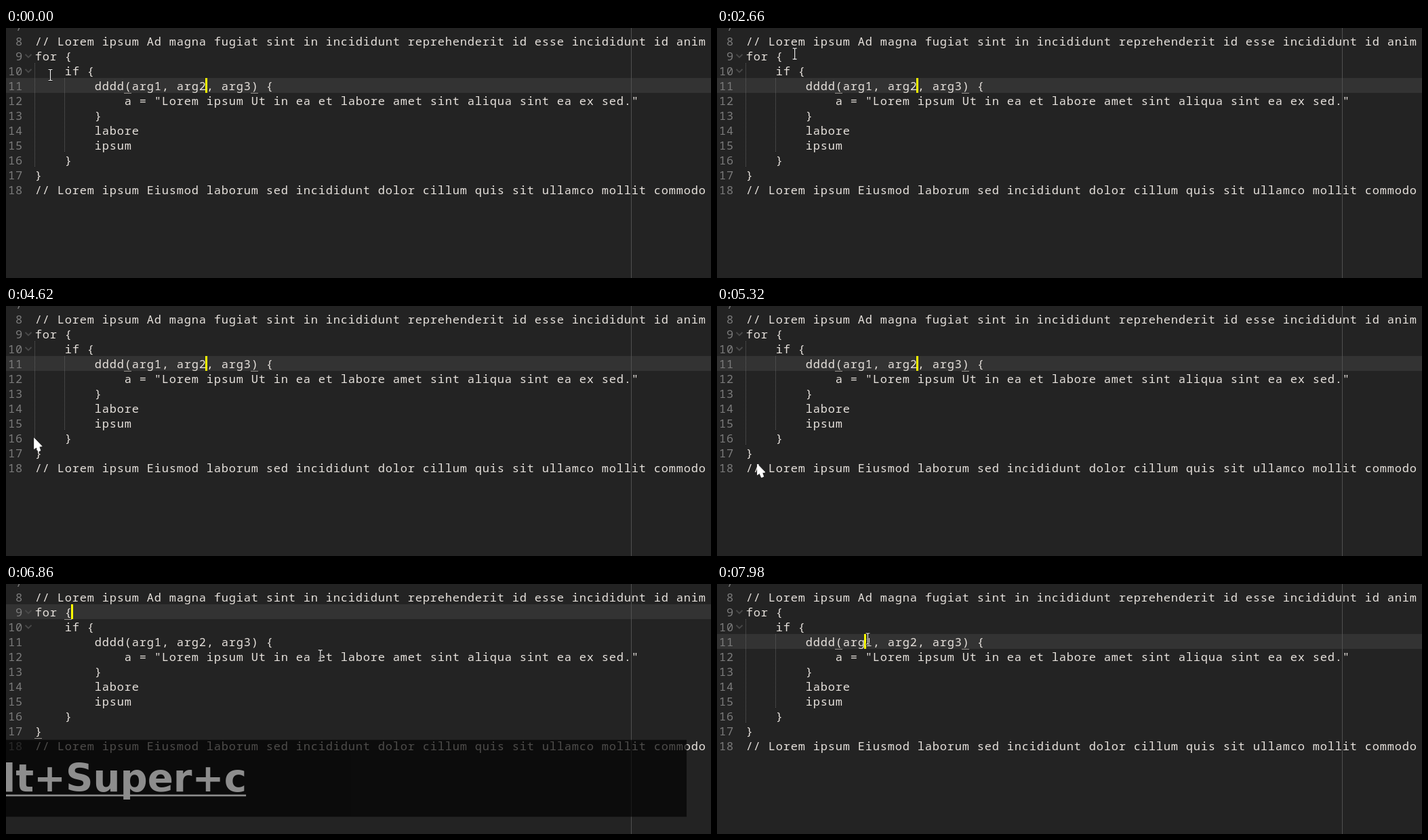
An HTML page that plays this animation: 1040x370 px, repeating every 8 s.

```html
<!DOCTYPE html>
<html lang="en">
<head>
<meta charset="utf-8">
<title>Editor</title>
<style>
  html, body { margin: 0; width: 100%; height: 100%; overflow: hidden; background: #232323; }
  svg { display: block; width: 1040px; height: 370px; }
  .code { font: 17px "Noto Sans Mono", "DejaVu Sans Mono", monospace; letter-spacing: .8px; fill: #e6e1dc; white-space: pre; }
  .num { fill: #7c7c7c; }
  .keys { font: bold 63.2px "DejaVu Sans", sans-serif; fill: #c3c3c3; text-anchor: end; }
</style>
</head>
<body>
<svg id="stage" viewBox="0 0 1040 370"></svg>
<script>
const LOOP = 8000, STEP = 70;
const LEFT = 42, CHAR = 11, ROW = 22, FIRST_ROW = 7;
const GLYPH_SHIFT = .7;
const JUMP = 6720, CLICK = 7840;
const stage = document.getElementById("stage");

const colX = col => LEFT + col * CHAR;
const rowY = row => 8 + (row - 8) * ROW;
const clamp = v => Math.min(1, Math.max(0, v));
const progress = (t, from, to) => clamp((t - from) / (to - from));
const easeOut = p => 1 - (1 - p) ** 2;
const easeInOut = p => p ** 3 * (10 - 15 * p + 6 * p * p);

function add(parent, tag, attrs = {}, text) {
  const el = document.createElementNS("http://www.w3.org/2000/svg", tag);
  for (const name in attrs) el.setAttribute(name, attrs[name]);
  if (text) el.textContent = text;
  parent.append(el);
  return el;
}

const show = (el, on) => el.setAttribute("visibility", on ? "visible" : "hidden");

const source = `
// Lorem ipsum Ad magna fugiat sint in incididunt reprehenderit id esse incididunt id anim
for {
    if {
        dddd(arg1, arg2, arg3) {
            a = "Lorem ipsum Ut in ea et labore amet sint aliqua sint ea ex sed."
        }
        labore
        ipsum
    }
}
// Lorem ipsum Eiusmod laborum sed incididunt dolor cillum quis sit ullamco mollit commodo`;

add(stage, "rect", { width: 1040, height: 370, fill: "#232323" });
const active = add(stage, "rect", { width: 1040, height: ROW, fill: "#333" });
add(stage, "rect", { x: 922, width: 1, height: 370, fill: "#505050" });

const guides = add(stage, "g", { stroke: "#626262", "stroke-dasharray": "1 1" });
function guide(col, from, to) {
  const x = colX(col) + .5;
  add(guides, "line", { x1: x, x2: x, y1: rowY(from), y2: rowY(to + 1) });
}
guide(0, 10, 16);
guide(4, 11, 15);

source.split("\n").forEach((line, i) => {
  const row = FIRST_ROW + i, y = rowY(row) + 18;
  const indent = line.length - line.trimStart().length;
  const digits = String(row).length;
  add(stage, "text", { class: "code num", x: colX(-1.6 - digits) + GLYPH_SHIFT, y }, String(row));
  add(stage, "text", { class: "code", x: colX(indent) + GLYPH_SHIFT, y }, line.trimStart());
});

for (const row of [9, 10]) {
  add(stage, "path", {
    d: `M28.5 ${rowY(row) + 9}l4.5 4.5l4.5 -4.5`,
    fill: "none", stroke: "#494949", "stroke-width": 1.8
  });
}

function bracket(group, row, col) {
  add(group, "rect", { x: colX(col), y: rowY(row) + ROW, width: CHAR, height: 1 });
}
const parens = add(stage, "g", { fill: "#98948f" });
bracket(parens, 11, 12);
bracket(parens, 11, 29);
const braces = add(stage, "g", { fill: "#98948f" });
bracket(braces, 9, 4);
bracket(braces, 17, 0);
const caret = add(stage, "rect", { width: 3, height: ROW, fill: "#ff0" });

const overlay = add(stage, "g");
add(overlay, "rect", { x: -700, y: 246, width: 1769, height: 128 });
add(overlay, "text", { class: "keys", x: 339, y: 332 }, "Alt+Super+c");
const underline = add(overlay, "rect", { x: -300, y: 337, width: 638, height: 3, fill: "#c3c3c3" });

const beam = add(stage, "g", { fill: "none" });
const beamPath = "M-3 -8.5H-1Q0 -8.5 0 -7.5V6.5Q0 7.5 -1 7.5H-3M3 -8.5H1Q0 -8.5 0 -7.5M0 6.5Q0 7.5 1 7.5H3";
add(beam, "path", { d: beamPath, stroke: "#111", "stroke-width": 2.8 });
add(beam, "path", { d: beamPath, stroke: "#f4f4f4", "stroke-width": 1.2 });
const arrow = add(stage, "path", {
  d: "M.5 0V16L3.8 13.6L6.5 19.8L9.8 18.4L7.8 12.8L12 12Z",
  fill: "#fff", stroke: "#fff", "stroke-width": .8, "stroke-linejoin": "round"
});

// Each move starts where the last one ended; bend bows it sideways.
const moves = [];
function move(from, to, x, y, bend = [0, 0], ease = easeOut) {
  moves.push({ from, to, end: [x, y], bend, ease });
}
move(0, 770, 117, 40.5);
move(1190, 1330, 111.5, 58.5);
move(1470, 1610, 94.5, 62.5);
move(1750, 2310, 88, 68, [8, -28]);
move(2380, 3080, 97, 75.5, [22, -36]);
move(3150, 3220, 89.5, 63.5);
move(3290, 4130, 56, 235, [10, 14]);
move(4130, 4970, 59, 234, [-18, -40]);
move(5320, 5670, 492, 110);
move(5810, 6020, 470, 106.5);
move(6790, 7280, 200.5, 102, [0, 0], easeInOut);
move(7280, 7630, 222.5, 81.5, [-24, 0]);

function pointer(t) {
  let pos = [65.5, 70];
  for (const { from, to, end, bend, ease } of moves) {
    const p = progress(t, from, to), bow = Math.sin(Math.PI * p);
    pos = pos.map((v, i) => v + (end[i] - v) * ease(p) + bend[i] * bow);
  }
  return pos;
}

// The key display grows out of the pointer, then fades back into it.
function drawOverlay(t) {
  const grow = 1 - (1 - progress(t, JUMP - STEP, JUMP + 4 * STEP)) ** 2.4;
  const fade = 1 - progress(t, CLICK - STEP, CLICK + 2 * STEP);
  const scale = grow * (.8 + .2 * fade);
  overlay.setAttribute("transform", `translate(483 108) scale(${scale}) translate(-483 -108)`);
  overlay.setAttribute("opacity", .84 * scale ** 2 * fade);
  show(underline, t <= JUMP + 2 * STEP);
}

function draw(time) {
  const t = Math.floor(time / STEP) * STEP;
  const onFor = t >= JUMP && t < CLICK;
  const row = onFor ? 9 : 11;
  const col = onFor ? 5 : t < JUMP ? 23 : 16;

  active.setAttribute("y", rowY(row));
  caret.setAttribute("x", colX(col) - 1);
  caret.setAttribute("y", rowY(row));
  show(guides, !onFor);
  show(parens, !onFor);
  show(braces, onFor);
  drawOverlay(t);

  const [x, y] = pointer(t);
  const pointing = t >= 4060 && t < 5390;
  show(arrow, pointing);
  show(beam, !pointing);
  (pointing ? arrow : beam).setAttribute("transform", `translate(${x} ${y})`);
}

const start = performance.now();
function tick() {
  draw((performance.now() - start) % LOOP);
  requestAnimationFrame(tick);
}
draw(0);
tick();
</script>
</body>
</html>
```
